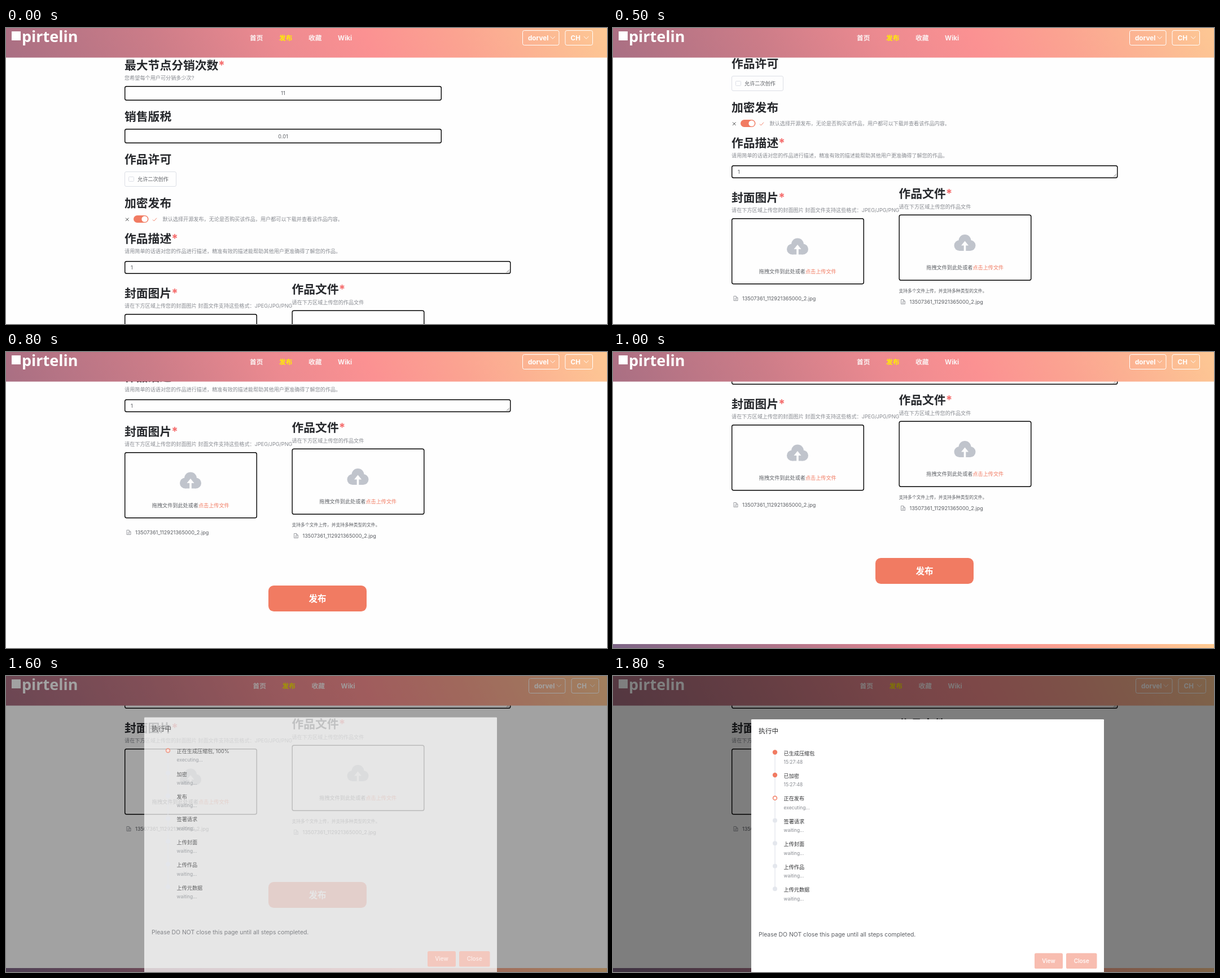
Write an HTML page with a canvas that moves like this. It is 1065 px wide and 526 px high and loops after 8800 ms.

```html
<!DOCTYPE html>
<html lang="zh-CN">
<head>
<meta charset="utf-8">
<title>发布</title>
<style>
  html, body { margin: 0; width: 100%; height: 100%; overflow: hidden; background: #fefefe; }
  canvas { display: block; width: 1065px; height: 526px; }
</style>
</head>
<body>
<canvas id="stage"></canvas>
<script>
const W = 1065, H = 526, LOOP = 8800, STEP = 100;
const CORAL = '#f17b62', INK = '#26282c', BODY = '#5c5f64', MUTED = '#878a90', PALE = '#dcdfe6';
const SMALL = 9.15;
const FONT = 'Inter, "Noto Sans CJK SC", "Noto Sans CJK", sans-serif';

// Page offset at each 100 ms tick from 300 ms on
const SCROLL = [50, 110, 170, 230, 284, 330, 363, 379];
// Dialog fade at each tick from 1500 ms on
const FADE = [0.04, 0.73, 0.95, 1];

const canvas = document.getElementById('stage');
const ctx = canvas.getContext('2d');
const dpr = window.devicePixelRatio || 1;
canvas.width = W * dpr;
canvas.height = H * dpr;

function tick(list, start, t, before) {
  if (t < start) return before;
  return list[Math.min(list.length - 1, Math.floor((t - start) / STEP))];
}

// cy is the visual middle of the line
function text(str, x, cy, size, color, { weight = 400, align = 'left', family = FONT } = {}) {
  ctx.font = `${weight} ${size}px ${family}`;
  ctx.textAlign = align;
  ctx.fillStyle = color;
  ctx.fillText(str, x, cy + size * 0.37);
  return ctx.measureText(str).width;
}

function box(x, y, w, h, r, color) {
  ctx.beginPath();
  ctx.roundRect(x, y, w, h, r);
  ctx.fillStyle = color;
  ctx.fill();
}

function frame(x, y, w, h, r, color, line) {
  ctx.beginPath();
  ctx.roundRect(x + line / 2, y + line / 2, w - line, h - line, r);
  ctx.strokeStyle = color;
  ctx.lineWidth = line;
  ctx.stroke();
}

function line(points, color, width) {
  ctx.beginPath();
  points.forEach(([x, y]) => ctx.lineTo(x, y));
  ctx.strokeStyle = color;
  ctx.lineWidth = width;
  ctx.stroke();
}

function disc(x, y, r, color) {
  ctx.beginPath();
  ctx.arc(x, y, r, 0, Math.PI * 2);
  ctx.fillStyle = color;
  ctx.fill();
}

function gradient(x0, y0, x1, y1, stops) {
  const g = ctx.createLinearGradient(x0, y0, x1, y1);
  stops.forEach(([at, color]) => g.addColorStop(at, color));
  return g;
}

function heading(str, x, cy, required) {
  const w = text(str, x, cy, 20.8, INK, { weight: 700 });
  if (required) text('*', x + w, cy, 20.8, '#f56c6c', { weight: 700 });
}

const note = (str, x, cy) => text(str, x, cy, SMALL, MUTED);
const field = (x, y, w, h) => frame(x, y, w, h, 3, '#000', 1.4);

function cloud(x, y) {
  const grey = '#c0c4cc';
  disc(x - 9.5, y + 5, 9.5, grey);
  disc(x + 9.5, y + 5, 9.5, grey);
  disc(x, y - 3.5, 11, grey);
  box(x - 9.5, y, 19, 14.5, 0, grey);
  ctx.beginPath();
  ctx.moveTo(x, y - 3);
  ctx.lineTo(x + 6.5, y + 5);
  ctx.lineTo(x - 6.5, y + 5);
  ctx.fillStyle = '#fefefe';
  ctx.fill();
  ctx.fillRect(x - 1.8, y + 4, 3.6, 11);
}

function fileRow(x, cy) {
  const l = x + 4, t = cy - 4;
  line([[l, t], [l + 4, t], [l + 7, t + 3], [l + 7, t + 8], [l, t + 8], [l, t]], MUTED, 0.8);
  line([[l + 4, t], [l + 4, t + 3], [l + 7, t + 3]], MUTED, 0.7);
  line([[l + 1.5, t + 4.3], [l + 5.5, t + 4.3]], MUTED, 0.7);
  line([[l + 1.5, t + 6.2], [l + 5.5, t + 6.2]], MUTED, 0.7);
  text('13507361_112921365000_2.jpg', x + 19, cy, 9.1, BODY);
}

function dropZone(x, y) {
  field(x, y, 235, 117.5);
  cloud(x + 117, y + 50);
  const w = text('拖拽文件到此处或者', x + 48.8, y + 94.5, SMALL, BODY);
  text('点击上传文件', x + 48.8 + w, y + 94.5, SMALL, CORAL);
}

function page(hover) {
  heading('最大节点分销次数', 210, 66, true);
  note('您希望每个用户可分销多少次?', 210, 89);
  field(210, 103, 562, 26);
  text('11', 491, 116, SMALL, BODY, { align: 'center' });

  heading('销售版税', 210, 157);
  field(210, 179, 562, 26);
  text('0.01', 491, 192.5, SMALL, BODY, { align: 'center' });

  heading('作品许可', 210, 233);
  frame(210, 255, 92, 27, 2.5, PALE, 1);
  frame(217, 264, 10, 9, 1, PALE, 1);
  text('允许二次创作', 233, 268.7, SMALL, BODY);

  heading('加密发布', 210, 311);
  line([[212, 337.5], [217.5, 343]], '#303133', 0.9);
  line([[217.5, 337.5], [212, 343]], '#303133', 0.9);
  box(226, 333, 26.5, 13, 6.5, CORAL);
  disc(245.7, 339.5, 5.3, '#fff');
  line([[260, 340.5], [262.3, 343], [267, 337.7]], CORAL, 0.9);
  note('默认选择开源发布，无论是否购买该作品，用户都可以下载并查看该作品内容。', 277.5, 339.5);

  heading('作品描述', 210, 374, true);
  note('请用简单的话语对您的作品进行描述，精准有效的描述能帮助其他用户更准确得了解您的作品。', 210, 397);
  field(210, 414, 684.5, 23);
  text('1', 221, 425.5, SMALL, BODY);
  line([[887, 434.5], [892, 429.5]], '#555', 0.8);
  line([[890, 434.5], [892, 432.5]], '#555', 0.8);

  heading('封面图片', 210, 471, true);
  note('请在下方区域上传您的封面图片 封面文件支持这些格式：JPEG/JPG/PNG', 210, 494);
  dropZone(210, 508);
  fileRow(210, 650.5);

  heading('作品文件', 506.5, 464.5, true);
  note('请在下方区域上传您的作品文件', 506.5, 488);
  dropZone(506.5, 501.5);
  text('支持多个文件上传，并支持多种类型的文件。', 506.5, 637, 7.8, BODY);
  fileRow(506.5, 656.5);

  box(465, 745, 174, 46, 9.5, hover ? '#fee90a' : CORAL);
  text('发布', 552, 768, 15.6, hover ? '#f56c6c' : '#fff', { weight: 700, align: 'center' });

  ctx.fillStyle = gradient(0, 0, W, 0, [
    [0, '#7d6586'], [0.3, '#b5768a'], [0.58, '#f58d93'], [0.75, '#fba190'], [1, '#ffcb92']
  ]);
  ctx.fillRect(0, 898, W, 60);
}

function picker(label, x, w) {
  frame(x, 4, w, 27, 3, '#fff', 1);
  text(label, x + 10, 17.3, 11.7, '#fff', { weight: 700 });
  const r = x + w - 7.5;
  line([[r - 8.5, 15], [r - 4.25, 19.2], [r, 15]], '#fff', 0.9);
}

// gap is the width freed by the hidden scrollbar
function header(gap) {
  ctx.fillStyle = gradient(0, 52, 873, -384, [
    [0, '#a96f83'], [0.25, '#cb7c88'], [0.45, '#ec8a90'], [0.6, '#fb9192'], [0.75, '#fba391'], [1, '#fdc894']
  ]);
  ctx.fillRect(0, 0, W, 52.6);

  box(10, 6, 16, 16, 0, '#fff');
  text('pirtelin', 28, 15, 27, '#fff', { weight: 600, family: '"Noto Sans", sans-serif' });

  ['首页', '发布', '收藏', 'Wiki'].forEach((label, i) =>
    text(label, 432 + 52 * i + gap / 2, 18, 11.7, i === 1 ? '#ffee00' : '#fbf1f1', { weight: 700 }));
  picker('dorvel', 915 + gap, 65.5);
  picker('CH', 990.5 + gap, 49.5);
}

const WAITING = ['生成压缩包', '加密', '发布', '签署请求', '上传封面', '上传作品', '上传元数据'];
const RUNNING = ['正在生成压缩包, 100%', '正在加密', '正在发布'];
const DONE = ['已生成压缩包', '已加密'];

function steps(current) {
  WAITING.forEach((label, i) => {
    const y = 135.5 + 40.45 * i;
    if (i < WAITING.length - 1) line([[287, y + 4], [287, y + 37]], '#e4e7ed', 1.3);
    let title = label, sub = 'waiting...';
    if (i < current) {
      title = DONE[i];
      sub = '15:27:48';
      disc(287, y, 4.2, CORAL);
    } else if (i === current) {
      title = RUNNING[i];
      sub = 'executing...';
      disc(287, y + 0.5, 4.2, CORAL);
      disc(287, y + 0.5, 2.7, '#fff');
    } else {
      disc(287, y, 4, '#e4e7ed');
    }
    text(title, 302.5, y + 1.7, SMALL, '#303133');
    text(sub, 302.5, y + 17.3, 8.45, MUTED);
  });
}

function dialog(fade, current) {
  ctx.fillStyle = `rgba(0,0,0,${fade / 2})`;
  ctx.fillRect(0, 0, W, H);
  ctx.save();
  ctx.globalAlpha = fade;
  ctx.translate(0, -13 * (1 - fade));
  box(245, 77, 625, 480, 1.3, '#fff');
  text('执行中', 258, 97.5, 11.7, '#303133');
  steps(current);
  text('Please DO NOT close this page until all steps completed.', 258, 459, 10.4, BODY);
  [['View', 747, 50], ['Close', 803, 54.5]].forEach(([label, x, w]) => {
    box(x, 492.5, w, 27.5, 2.6, '#f8bdb0');
    text(label, x + w / 2, 506, 10, '#fff', { weight: 500, align: 'center' });
  });
  ctx.restore();
}

function draw(t) {
  const fade = tick(FADE, 1500, t, 0);
  ctx.setTransform(dpr, 0, 0, dpr, 0, 0);
  ctx.fillStyle = '#fefefe';
  ctx.fillRect(0, 0, W, H);
  ctx.save();
  ctx.translate(0, -tick(SCROLL, 300, t, 0));
  page(t >= 1300 && t < 1600);
  ctx.restore();
  header(t >= 1500 ? 11 : 0);
  if (fade) dialog(fade, tick([0, 0, 1, 2], 1500, t, 0));
}

const began = performance.now();
function play() {
  draw((performance.now() - began) % LOOP);
  requestAnimationFrame(play);
}
play();
</script>
</body>
</html>
```
